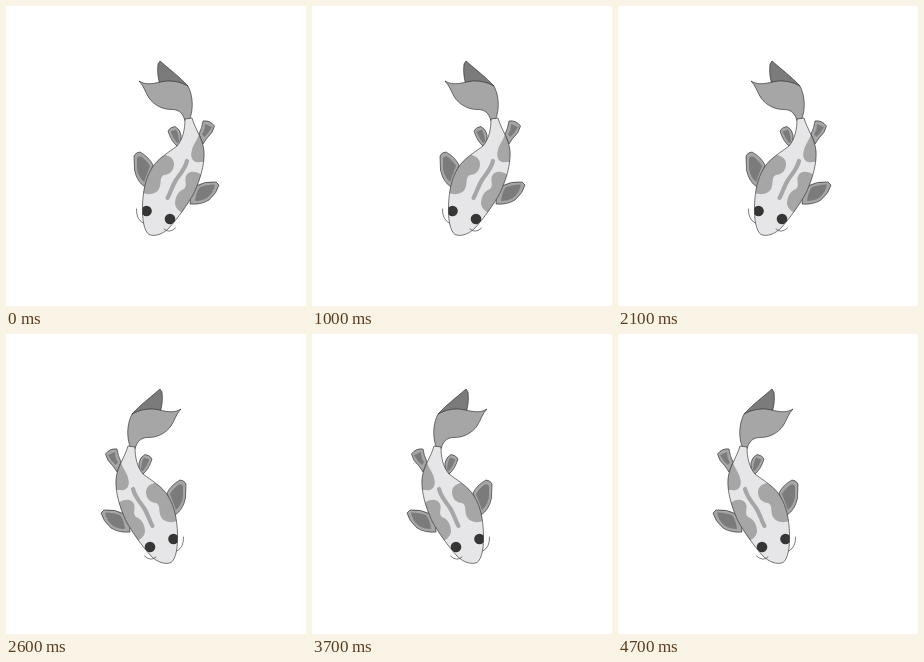
Recreate the animation shown at these times as an HTML page. Size 300 px wide and 300 px high, loop 5000 ms.

```html
<!DOCTYPE html>
<html lang="en">
<head>
<meta charset="utf-8">
<title>Koi</title>
<style>
  html, body { margin: 0; width: 100%; height: 100%; overflow: hidden; background: #fff; }
  svg { display: block; width: 100vw; height: 100vh; }
  .line { stroke: #222; stroke-width: .6; stroke-linejoin: round; }
  .pale { fill: #e6e6e8; }
  .mid { fill: #a6a6a6; }
  .dark { fill: #7b7b7b; }
  .eye { fill: #363636; }
  .open { fill: none; stroke-linecap: round; }
</style>
</head>
<body>
<svg viewBox="0 0 300 300">
  <defs>
    <path id="body" d="M179 113C179 123 177 133 171 140C162 147 152 152 146 162C139 173 137 186 136.500 200C136 213 138 225 143 228.500C149 231 157 228 163 222C172 212 182 198 188 187C194 174 199 158 198 145C197 133 189 123 186 112Z"/>
    <clipPath id="skin"><use href="#body"/></clipPath>
  </defs>
  <g id="fish">
    <!-- tail -->
    <path class="dark line" d="M154 55L152 58C151 66 152 72 154 79L182 80C174 71 163 63 154 55Z"/>
    <path class="mid line" d="M133 75C141 80 149 77 157 75.500C166 74 175 76 182 80C187 90 188 103 183 115L179 115C177 107 173 104 167 103.500C157 104 148 99 143 92C139 86 138 80 133 75Z"/>
    <!-- small fins -->
    <path class="mid line" d="M162 125Q164 121 169 120.500Q174 123 175 129L175 138L171 140Q165 135 162 125Z"/>
    <path class="dark" d="M164.500 125.500L170 123.500Q173 129 173 136L171 137Q167 132 164.500 125.500Z"/>
    <path class="mid line" d="M197 115Q204 114 208.500 120Q207 127 201 132L197 138L193 128Q196 122 197 115Z"/>
    <path class="dark" d="M199 118L206 121Q203 127 198 131L196 128Q199 124 199 118Z"/>
    <!-- side fins -->
    <path class="mid line" d="M128 150Q130 146 134 146Q143 151 147 159L139 181Q131 176 128.500 164Z"/>
    <path class="dark" d="M131 152Q133 149 136 151Q142 156 144 160L138 176Q132 171 131 162Z"/>
    <path class="mid line" d="M184 198Q184 187 190 180Q199 175 210 176L213 179Q211 187 203 194Q195 199 184 198Z"/>
    <path class="dark" d="M189 195Q190 186 194 181Q202 178 209 178.500Q208 186 201 192Q196 195 189 195Z"/>
    <!-- body and markings -->
    <use href="#body" class="pale"/>
    <g clip-path="url(#skin)">
      <path class="mid" d="M194 125C193 132 187 138 186 144C184 150 186 155 190 156C194 157 196 155 202 157V125Z"/>
      <path class="mid" d="M155 148C161 149 168 151 168 158C168 165 163 169 158 169C153 171 156 177 153 183C150 188 143 190 134 186V160Z"/>
      <path class="mid" d="M197 170C191 165 183 164 180 170C178 175 182 179 178 183C172 185 169 191 169 198C170 203 174 206 179 208L192 190Z"/>
      <path class="open" d="M181 155C179 163 174 168 170 174C166 180 165 186 161.500 192" stroke="#a6a6a6" stroke-width="4.200"/>
      <circle class="eye" cx="140.500" cy="205" r="5.300"/>
      <circle class="eye" cx="164" cy="213" r="5.300"/>
    </g>
    <use href="#body" class="line" fill="none"/>
    <!-- whiskers -->
    <path class="line open" d="M130.500 203Q130 213 137 217M158 223Q163 228 169.500 222"/>
  </g>
</svg>
<script>
  const fish = document.getElementById('fish');
  const beat = 500;

  // The fish flips to its mirror image on every beat.
  function draw(now) {
    const flipped = Math.floor(now / beat) % 2 === 1;
    fish.setAttribute('transform', flipped ? 'matrix(-1 0 0 1 308 0)' : '');
    requestAnimationFrame(draw);
  }
  draw(performance.now());
</script>
</body>
</html>
```
